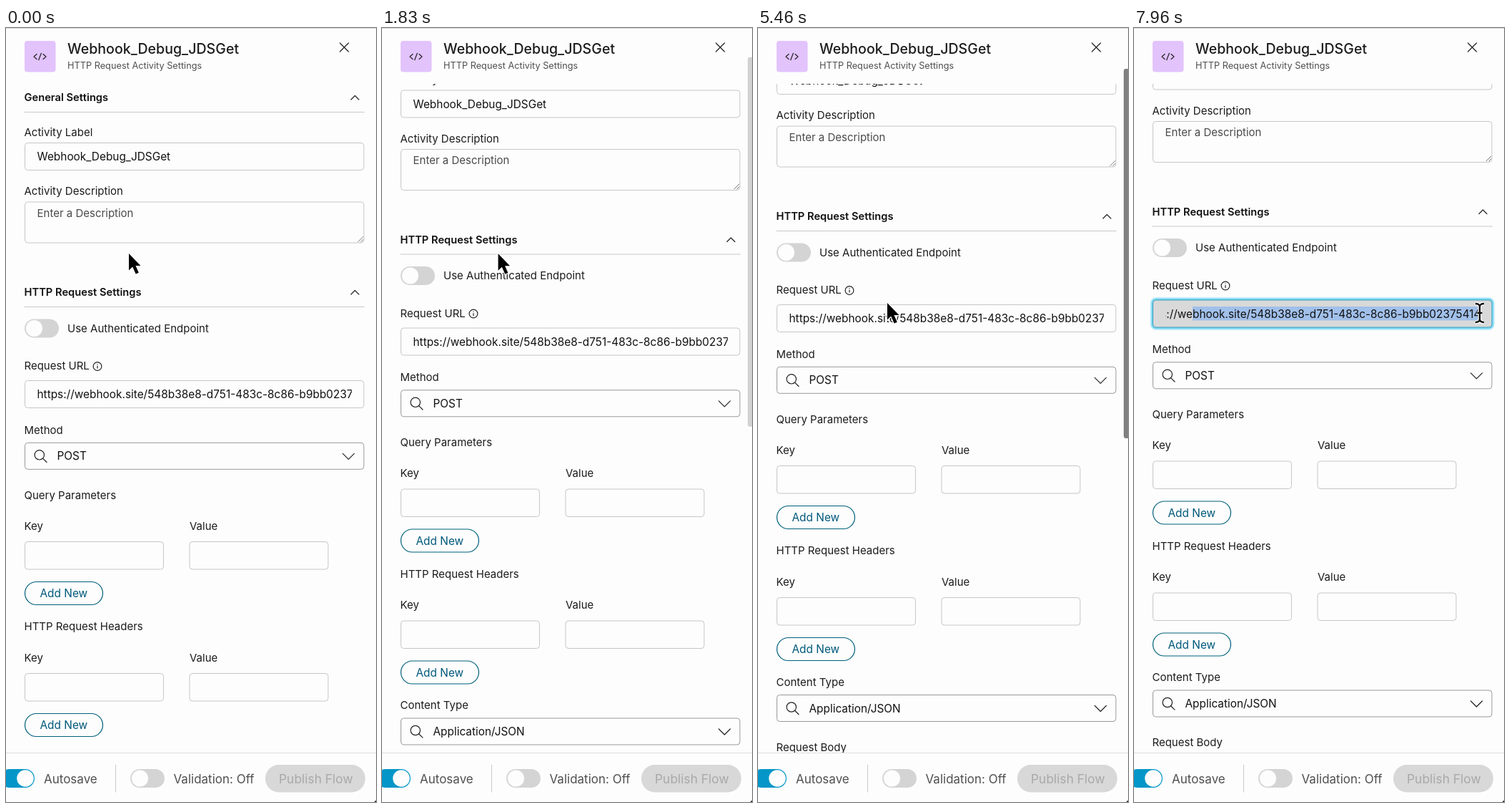
Recreate the animation shown at these times as an HTML page. Size 518 by 1081 pixels, loop 8 s.

```html
<!DOCTYPE html>
<html lang="en">
<head>
<meta charset="utf-8">
<title>HTTP request settings</title>
<style>
  html, body { margin: 0; width: 100%; height: 100%; overflow: hidden; background: #fdfdfd; }
  svg { display: block; font-family: Inter, Roboto, sans-serif; }
  text { white-space: pre; }
  .line { fill: none; stroke: #222; stroke-width: 1.2; stroke-linecap: round; stroke-linejoin: round; }
</style>
</head>
<body>
<svg id="stage" width="518" height="1081" viewBox="0 0 518 1081"></svg>
<script>
const LOOP = 8000;
const URL_TEXT = 'https://webhook.site/548b38e8-d751-483c-8c86-b9bb02375414';

// Static parts; text is placed by the middle of its capitals.
const text = (x, y, str, size = 15, fill = '#1c1c1c', weight = 400) =>
  `<text x="${x}" y="${y + size * 0.364}" font-size="${size}" fill="${fill}" font-weight="${weight}">${str}</text>`;
const rect = (x, y, w, h, r, fill, stroke = 'none', more = '') =>
  `<rect x="${x}" y="${y}" width="${w}" height="${h}" rx="${r}" fill="${fill}" stroke="${stroke}" ${more}/>`;
const path = (d, more = '') => `<path class="line" d="${d}" ${more}/>`;
const box = (x, y, w, h, stroke = '#c6c6c6') => rect(x, y, w, h, 4, '#fdfdfd', stroke);
const rule = y => path(`M26 ${y}H501.5`, 'style="stroke:#c8c8c8;stroke-width:1"');

const section = (y, title) =>
  text(25.5, y, title, 14.7, '#111', 600) + path(`M483 ${y + 3}l5.5 -5.5 5.5 5.5`) + rule(y + 20.5);

const toggle = (x, y, id) =>
  rect(x, y - 13, 48, 26, 13, '#d4d4d4', 'none', `id="${id}"`) +
  `<circle cx="${x + 13.5}" cy="${y}" r="12" fill="#fdfdfd" stroke="#c9c9c9" stroke-width=".6"/>`;

const select = (y, value) =>
  box(26.5, y - 18.5, 474.5, 37, '#999') +
  `<circle class="line" cx="46.8" cy="${y - 1.5}" r="6.7"/>` +
  path(`M51.8 ${y + 3.5}l5.2 5.2M471.5 ${y - 3.5}l8 8 8 -8`) +
  text(71.5, y, value, 15.4, '#111');

const pairs = y =>
  text(25.5, y, 'Key') + text(257, y, 'Value') +
  box(26.5, y + 22, 194, 38.5) + box(257, y + 22, 194, 38.5) +
  rect(26.5, y + 78, 109, 32, 16, '#fdfdfd', '#00607c', 'stroke-width="1.2"') +
  text(47.5, y + 94, 'Add New', 15.4, '#00587a');

const content =
  section(97, 'General Settings') +
  text(25.5, 145.5, 'Activity Label') + box(26.5, 160.5, 474.5, 38) +
  text(43.5, 179.5, 'Webhook_Debug_JDSGet', 15.4, '#111') +
  text(25.5, 228, 'Activity Description') + box(26.5, 243, 474.5, 57) +
  text(43.5, 258.5, 'Enter a Description', 15, '#4a4a4a') +
  path('M493 298.5l7 -7M497 298.5l3 -3', 'style="stroke:#777;stroke-width:1"') +
  section(369, 'HTTP Request Settings') +
  toggle(26, 419.5, 'auth') + text(86, 419.5, 'Use Authenticated Endpoint') +
  text(25.5, 472, 'Request URL') +
  '<circle class="line" cx="128" cy="472.5" r="5.9"/>' + path('M128 472v3M128 469.6v.1') +
  '<g id="glow">' + rect(25.5, 491.5, 476.5, 40, 5, 'none', '#5fd0f2', 'stroke-width="3.4" filter="url(#blur)"') + '</g>' +
  rect(26.5, 492.5, 474.5, 38, 4, '#fdfdfd', '#c6c6c6', 'id="field"') +
  '<g clip-path="url(#value)">' + rect(117, 501.5, 0, 19.5, 0, '#a1c0ea', 'none', 'id="mark"') +
  '<g id="url">' + text(43.5, 511.5, URL_TEXT, 15.4, '#111') + '</g></g>' +
  text(25.5, 561.5, 'Method') + select(597.8, 'POST') +
  text(25.5, 652.5, 'Query Parameters') + pairs(695.5) +
  text(25.5, 836, 'HTTP Request Headers') + pairs(879.5) +
  text(25.5, 1019.5, 'Content Type') + select(1056, 'Application/JSON') +
  text(25.5, 1110.5, 'Request Body');

const header =
  path('M0 .5H518', 'style="stroke:#d9d9d9"') +
  rect(26, 18, 43.5, 43.5, 4, '#e2c3fc') +
  path('M43 36.5l-4 3.5 4 3.5M52 36.5l4 3.5 -4 3.5M49.3 35.3l-3.6 9.4') +
  text(86, 29.2, 'Webhook_Debug_JDSGet', 19.6, '#1c1c1c', 500) +
  text(86, 52.5, 'HTTP Request Activity Settings', 12.75, '#505050') +
  path('M467.5 21l12 12M479.5 21l-12 12');

const footer =
  rect(0, 1012, 518, 69, 0, '#fdfdfd') +
  path('M0 1012.5H518', 'style="stroke:#dedede"') +
  rect(-8, 1035, 48, 26, 13, '#0496c8') + '<circle cx="27" cy="1048" r="11.8" fill="#fdfdfd"/>' +
  text(53, 1048.5, 'Autosave', 17, '#505050') +
  path('M153.5 1029.5V1067', 'style="stroke:#cfcfcf"') +
  toggle(174, 1048, 'valid') + text(234.5, 1048.5, 'Validation: Off', 17, '#505050') +
  rect(363, 1029, 140, 38.5, 19.2, '#d8d8d8') + text(382, 1048.5, 'Publish Flow', 17.4, '#a9a9a9') +
  '<path d="M518 1078.5V1081H515.5Z" fill="#222"/>';

const beam = 'M-6 -13Q0 -13 0 -8.5V8.5Q0 13 -6 13M6 -13Q0 -13 0 -8.5M0 8.5Q0 13 6 13M-3.5 0H3.5';
const cursors =
  `<g id="arrow"><path d="M0 0V23.5L5.2 18.6 9.7 28.5 13.8 26.8 9.5 17H16.5Z" fill="#000" stroke="#fff" stroke-width="2.4" paint-order="stroke"/></g>
   <g id="hand"><path d="M0 12L-2.5 4Q-3 .5 0 0Q2.5 0 3.5 3L6 10Q8 8 10.5 10Q13 8.5 15 11Q18 10 20 13.5Q21.5 19 19.5 24L18 30.5H4L3 27Q-2 23 -6 17Q-7.5 14.5 -5.5 13.5Q-2.5 13 1.5 17Z"
     fill="#fff" stroke="#111" stroke-width="2" stroke-linejoin="round"/>
     <path class="line" d="M7.5 17l1 8M11.5 17l.6 8M15.5 17l.2 8" style="stroke-width:1.6"/></g>
   <g id="beam" fill="none"><path d="${beam}" stroke="#fff" stroke-width="5"/><path d="${beam}" stroke="#111" stroke-width="2.4"/></g>`;

document.getElementById('stage').innerHTML =
  `<defs>
    <clipPath id="view"><rect y="78" width="518" height="934"/></clipPath>
    <clipPath id="value"><rect x="44" y="492" width="440" height="39"/></clipPath>
    <filter id="blur" x="-5%" y="-40%" width="110%" height="180%"><feGaussianBlur stdDeviation="1"/></filter>
  </defs>
  <g clip-path="url(#view)"><g id="content">${content}</g></g>` +
  header + footer + rect(512, 4, 12, 516, 3, '#808080', 'none', 'id="thumb"') + cursors;

const $ = id => document.getElementById(id);
const set = (id, attrs) => { for (const k in attrs) $(id).setAttribute(k, attrs[k]); };
const move = (id, x, y) => set(id, { transform: `translate(${x} ${y})` });
const part = (t, a, b) => Math.min(1, Math.max(0, (t - a) / (b - a)));
const out = (u, k) => 1 - (1 - u) ** k;
const smooth = u => u * u * (3 - 2 * u);

// Pointer hot spot: time, x, y
const track = [
  [1720, 171, 312], [2360, 66, 352], [2660, 66, 352], [2830, 71, 354], [3060, 40, 351],
  [3460, 61, 351], [3660, 61, 351], [3860, 50, 351], [4630, 50, 351], [5030, 181, 384],
  [5720, 181, 384], [6350, 121, 399], [6560, 121, 399], [7550, 484, 411], [7900, 484, 398]
];

function pointer(t) {
  if (t < 30) return [172, 315];
  const i = track.findIndex(p => p[0] > t);
  if (i === 0) return track[0].slice(1);
  if (i < 0) return track[track.length - 1].slice(1);
  const [a, b] = [track[i - 1], track[i]], u = smooth(part(t, a[0], b[0]));
  return [a[1] + (b[1] - a[1]) * u, a[2] + (b[2] - a[2]) * u];
}

function draw(t) {
  const scroll = 73.5 * out(part(t, 500, 1130), 1.56) + 38 * out(part(t, 5300, 5560), 2) + part(t, 5690, 5730);
  move('content', 0, -scroll);

  const shown = t < 5300 ? part(t, 480, 520) - part(t, 1700, 1900) : 1 - part(t, 6530, 6750);
  set('thumb', { y: 4 + scroll / 2, opacity: shown });

  const [x, y] = pointer(t);
  const kind = t < 2260 ? 'arrow' : t < 4740 ? 'hand' : t < 5740 ? 'arrow' : 'beam';
  for (const id of ['arrow', 'hand', 'beam']) set(id, { visibility: id === kind ? 'visible' : 'hidden' });
  move(kind, x, y);
  set('auth', { fill: kind === 'hand' ? '#bfbfc1' : '#d4d4d4' });

  const focus = part(t, 6400, 6500), shift = 35 * part(t, 7500, 7900);
  set('glow', { opacity: focus });
  set('field', focus ? { fill: '#d9d9d9', stroke: '#3d9dbb' } : { fill: '#fdfdfd', stroke: '#c6c6c6' });
  move('url', -shift, 0);
  const start = 117 - shift;
  set('mark', { x: start, width: t > 6560 ? Math.max(0, Math.min(x, 484) - start) : 0 });
}

function tick() {
  draw(performance.now() % LOOP);
  requestAnimationFrame(tick);
}
tick();
</script>
</body>
</html>
```
